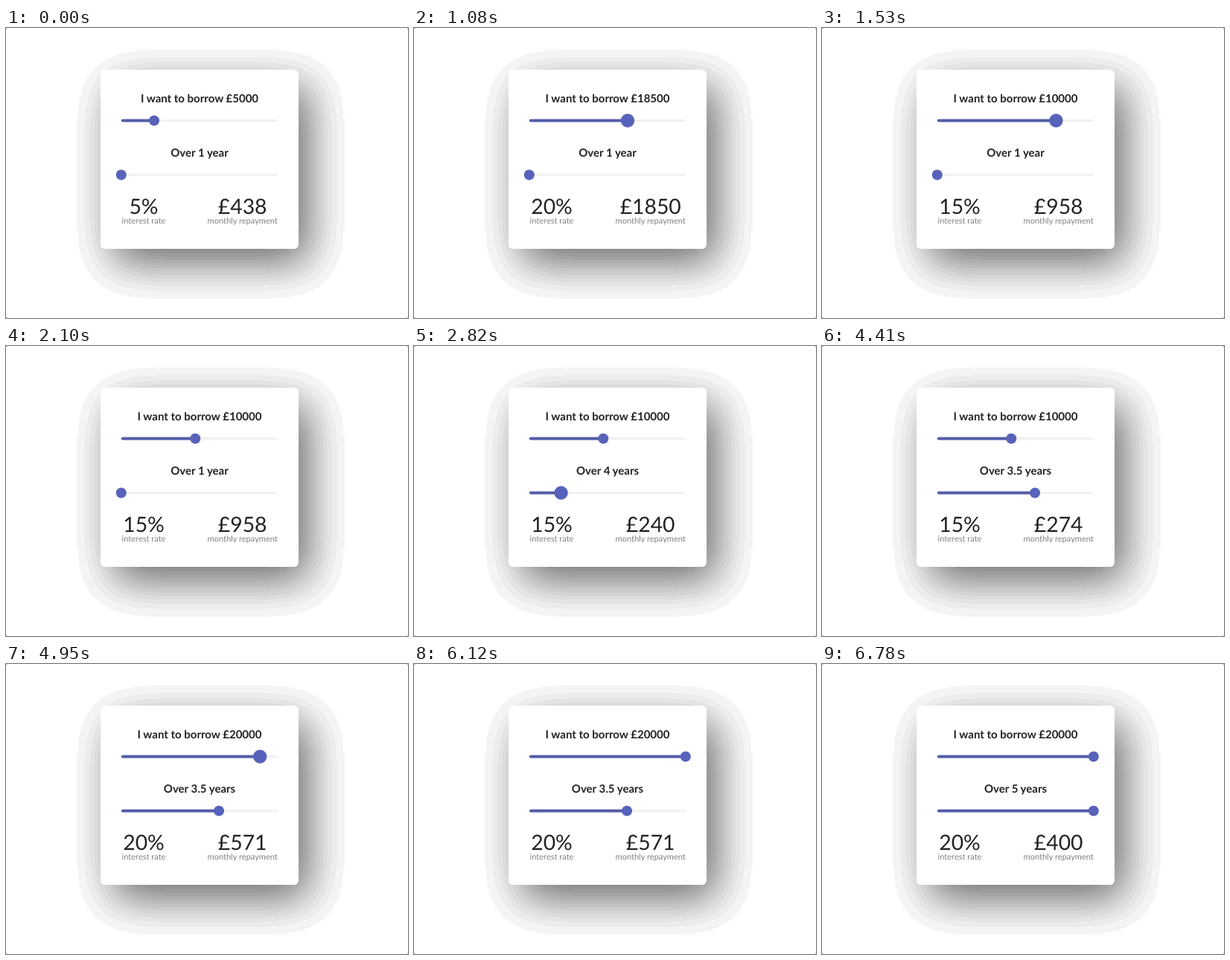
An HTML page that plays this animation: 540 by 390 pixels, repeating every 7530 ms.

```html
<!DOCTYPE html>
<html lang="en">
<head>
<meta charset="utf-8">
<title>Loan calculator</title>
<style>
  html, body { margin: 0; width: 100%; height: 100%; overflow: hidden; background: #8c8c8c; }
  svg { display: block; width: 540px; height: 390px; }
  text { font-family: Lato, sans-serif; text-anchor: middle; text-rendering: geometricPrecision; fill: #222; }
  .title { font-size: 15px; font-weight: 700; }
  .figure { font-size: 28.3px; }
  .caption { font-size: 11.05px; fill: #808080; }
  .rail, .fill { stroke-linecap: round; }
  .rail { stroke: #f1f1f1; stroke-width: 3; }
  .fill { stroke: #545da9; stroke-width: 4; }
  .knob { fill: #5763ba; }
</style>
</head>
<body>
<svg viewBox="0 0 540 390">
  <defs>
    <filter id="soft" filterUnits="userSpaceOnUse" x="0" y="0" width="540" height="390" color-interpolation-filters="sRGB">
      <feGaussianBlur stdDeviation="30"/>
      <feComponentTransfer><feFuncA id="bands" type="discrete" tableValues="0 1"/></feComponentTransfer>
    </filter>
  </defs>
  <rect width="540" height="390" rx="2.5" fill="#fff"/>
  <g filter="url(#soft)">
    <rect x="142" y="76" width="266" height="241" rx="6" fill-opacity=".6"/>
  </g>
  <rect x="127" y="56" width="266" height="241" rx="6" fill="#fff"/>

  <text class="title" id="loanText" x="260" y="99.5"></text>
  <g id="loanSlider" transform="translate(154.8 124.5)">
    <line class="rail" x1="1" x2="208.5"/>
    <line class="fill" x1="2"/>
    <circle class="knob"/>
  </g>

  <text class="title" id="termText" x="260" y="172.5"></text>
  <g id="termSlider" transform="translate(154.8 197.5)">
    <line class="rail" x1="1" x2="208.5"/>
    <line class="fill" x1="2"/>
    <circle class="knob"/>
  </g>

  <text class="figure" id="rateText" x="185" y="249.5"></text>
  <text class="caption" x="185" y="263">interest rate</text>
  <text class="figure" id="payText" x="317.7" y="249.5"></text>
  <text class="caption" x="317.7" y="263">monthly repayment</text>
</svg>
<script>
  const LOOP = 7530;
  const $ = id => document.getElementById(id);

  // Times in ms; holds are the spans in which a knob is pressed
  const loan = {
    id: 'loanSlider', min: 1000, max: 20000, step: 500, first: 5000,
    moves: [
      { start: 584, time: 700, to: 18500 },
      { start: 1170, time: 650, to: 10000 },
      { start: 4440, time: 600, to: 20000 }
    ],
    holds: [[420, 2100], [4410, 5370]]
  };
  const term = {
    id: 'termSlider', min: 1, max: 5, step: 0.5, first: 1,
    moves: [
      { start: 2520, time: 650, to: 4.5 },
      { start: 3330, time: 430, to: 3.5 },
      { start: 6150, time: 430, to: 5 }
    ],
    holds: [[2520, 3840], [6120, 6760]]
  };

  const bandCount = 32;
  $('bands').setAttribute('tableValues',
    Array.from({ length: bandCount }, (_, k) => k && (k + 0.5) / bandCount).join(' '));

  function ease(p) {
    p = Math.min(1, Math.max(0, p));
    return p * p * (3 - 2 * p);
  }

  // Sum of eased moves, each delayed and paced relative to its own time
  function follow(slider, t, lag, pace) {
    let value = slider.first, from = slider.first;
    for (const { start, time, to } of slider.moves) {
      value += (to - from) * ease((t - start - lag * time) / (pace * time));
      from = to;
    }
    return value;
  }

  function valueOf(slider, t) {
    return Math.round(follow(slider, t, 0, 0.6) / slider.step) * slider.step;
  }

  function knobRadius(slider, t) {
    return slider.holds.reduce((r, [down, up]) =>
      r + 2.2 * (ease((t - down) / 250) - ease((t - up) / 270 + 1)), 7);
  }

  // The knob trails behind the chosen value
  function drawSlider(slider, t) {
    const part = (follow(slider, t, 0.15, 1) - slider.min) / (slider.max - slider.min);
    const x = 210 * part;
    const [, fill, knob] = $(slider.id).children;
    fill.setAttribute('x2', Math.max(2, x));
    knob.setAttribute('cx', x);
    knob.setAttribute('r', knobRadius(slider, t));
  }

  function setText(id, text) {
    const el = $(id);
    if (el.textContent !== text) el.textContent = text;
  }

  const rateFor = sum => sum >= 15000 ? 20 : sum >= 10000 ? 15 : sum > 5000 ? 10 : 5;

  function draw(t) {
    const sum = valueOf(loan, t);
    const years = valueOf(term, t);
    const rate = rateFor(sum);
    const pay = Math.round(sum * (1 + rate / 100) / (years * 12));
    setText('loanText', `I want to borrow £${sum}`);
    setText('termText', `Over ${years} year${years === 1 ? '' : 's'}`);
    setText('rateText', `${rate}%`);
    setText('payText', `£${pay}`);
    drawSlider(loan, t);
    drawSlider(term, t);
  }

  const start = performance.now();
  function tick(now) {
    draw(Math.max(0, now - start) % LOOP);
    requestAnimationFrame(tick);
  }
  draw(0);
  requestAnimationFrame(tick);
</script>
</body>
</html>
```
